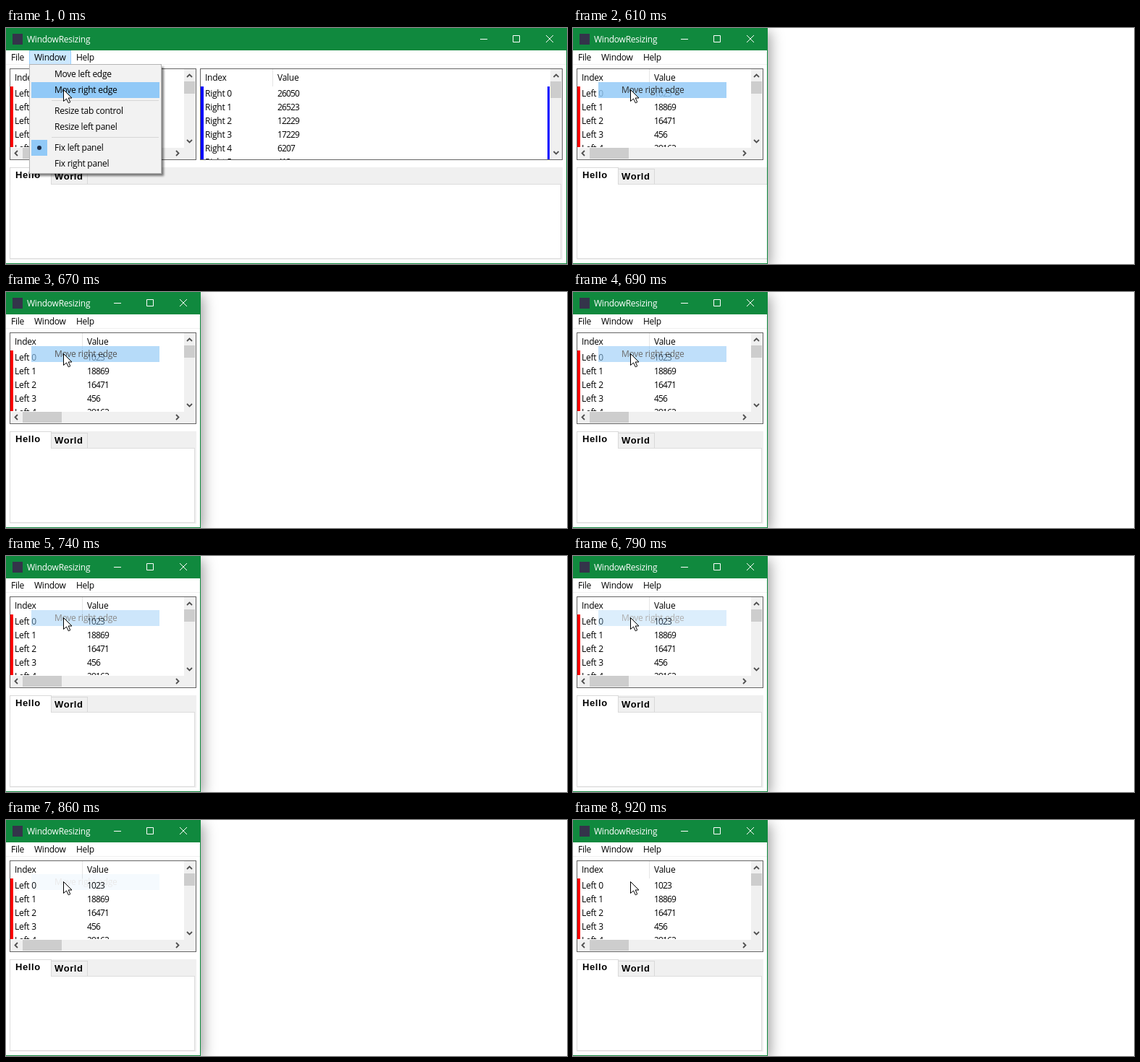
These frames come from a looping animation (775x327 px, 1.92 s). An HTML page:

```html
<!DOCTYPE html>
<html lang="en">
<head>
<meta charset="utf-8">
<title>WindowResizing</title>
<style>
  html, body { margin: 0; width: 100%; height: 100%; overflow: hidden; background: #fff; }
  body { position: relative; }
  svg, .win, .tabs, .page, .tab { position: absolute; box-sizing: border-box; }
  svg { left: 0; top: 0; width: 775px; height: 327px; }
  text { font: 12px "Open Sans", "Noto Sans", sans-serif; letter-spacing: -.25px; fill: #000; white-space: pre; }
  rect { shape-rendering: crispEdges; }
  .num { letter-spacing: -.86px; }
  .line { fill: none; stroke-width: 1; }

  .win, .tabs, .buttons, .popup, .item { animation: 1920ms step-end infinite; }
  .win {
    left: 0; top: 0; width: 775px; height: 327px; overflow: hidden; background: #fff;
    box-shadow: 3px 5px 18px rgba(0, 0, 0, .4);
    animation-name: shrink;
  }
  .win::after { content: ""; position: absolute; inset: 0; border: 1px solid #10893e; border-left: 0; }

  .tabs { left: 5px; top: 193px; width: 764px; height: 128px; background: #f0f0f0; animation-name: fit; }
  .page { left: 0; top: 23px; right: 2px; bottom: 1px; background: #fff; border: 1px solid #dcdcdc; }
  .tab {
    border: 1px solid #d9d9d9; border-bottom: 0; background: #f0f0f0;
    font: bold 13px/18px "Liberation Sans", Arial, sans-serif; letter-spacing: .6px; white-space: nowrap;
  }
  .hello { left: 0; top: 0; width: 58px; height: 24px; padding: 1px 0 0 7px; background: #fff; }
  .world { left: 57px; top: 2px; width: 51px; height: 21px; padding: 1px 0 0 4px; }

  .buttons { animation-name: slide; }
  .popup { animation-name: close; }
  .item { animation-name: fade; }

  @keyframes shrink { 0% { width: 775px; } 31.77%, 100% { width: 269px; } }
  @keyframes fit { 0% { width: 764px; } 33.333%, 100% { width: 258px; } }
  @keyframes slide { 0% { transform: none; } 31.77%, 100% { transform: translateX(-506px); } }
  @keyframes close { 0% { visibility: visible; } 31.77%, 100% { visibility: hidden; } }
  @keyframes fade {
    0% { opacity: 1; }
    31.77% { opacity: .82; }
    33.333% { opacity: .75; }
    34.895% { opacity: .66; }
    35.937% { opacity: .58; }
    38.541% { opacity: .45; }
    41.145% { opacity: .31; }
    42.708% { opacity: .2; }
    44.791% { opacity: .08; }
    47.916%, 100% { opacity: 0; }
  }
</style>
</head>
<body>
<div class="win">
  <svg viewBox="0 0 775 327">
    <defs>
      <clipPath id="leftRows"><rect x="6" y="57" width="240" height="108"/></clipPath>
      <clipPath id="rightRows"><rect x="269" y="57" width="483" height="125"/></clipPath>
      <path id="chevron" class="line" d="M-3.5 2L0 -1.5L3.5 2" stroke="#505050" style="stroke-width:1.8"/>
    </defs>

    <rect width="775" height="31" fill="#10893e"/>
    <rect x="9" y="8" width="14" height="15" fill="#34344a"/>
    <text x="29" y="20" style="fill:#fff">WindowResizing</text>
    <g class="buttons line" stroke="#fff">
      <path d="M655 15.5H665M700.5 10.5H709.5V19.5H700.5Z"/>
      <path d="M746 10L756 20M756 10L746 20"/>
    </g>

    <rect y="50" width="775" height="1" fill="#f0f0f0"/>
    <rect class="popup" x="32.5" y="31.5" width="57" height="19" fill="#cce8ff" stroke="#99d1ff"/>
    <text x="7" y="45">File</text>
    <text x="39" y="45">Window</text>
    <text x="97" y="45">Help</text>

    <g class="line">
      <rect x="5.5" y="56.5" width="257" height="126" stroke="#646464"/>
      <rect x="268.5" y="56.5" width="500" height="126" stroke="#646464"/>
      <path d="M105.5 57V81M368.5 57V81" stroke="#e5e5e5"/>
    </g>
    <g id="left" clip-path="url(#leftRows)"></g>
    <g id="right" clip-path="url(#rightRows)"></g>
    <rect x="6" y="81" width="4" height="84" fill="#f00"/>
    <path d="M269 81h4v101h-4zM748 81h3v101h-3z" fill="#00f"/>

    <path d="M246 57h16v125H6v-16H246zM752 57h16v125h-16z" fill="#f0f0f0"/>
    <path d="M246 74h15v17h-15zM23 166h54v15H23zM752 74h15v23h-15z" fill="#cdcdcd"/>
    <use href="#chevron" transform="translate(253.5 66)"/>
    <use href="#chevron" transform="translate(253.5 157) rotate(180)"/>
    <use href="#chevron" transform="translate(14 173.5) rotate(-90)"/>
    <use href="#chevron" transform="translate(237 173.5) rotate(90)"/>
    <use href="#chevron" transform="translate(760 66)"/>
    <use href="#chevron" transform="translate(760 173) rotate(180)"/>
  </svg>
  <div class="tabs">
    <div class="page"></div>
    <div class="tab hello">Hello</div>
    <div class="tab world">World</div>
  </div>
</div>

<svg viewBox="0 0 775 327">
  <defs>
    <filter id="blur" x="-10%" y="-10%" width="120%" height="120%"><feGaussianBlur stdDeviation="1.5"/></filter>
  </defs>
  <g class="popup">
    <rect x="36" y="54" width="182" height="151" opacity=".5" filter="url(#blur)"/>
    <rect x="32.5" y="50.5" width="182" height="151" fill="#f2f2f2" stroke="#b4b4b4"/>
    <path class="line" d="M63 100.5H211M63 151.5H211" stroke="#d7d7d7"/>
    <rect x="35" y="155" width="22" height="22" fill="#91c9f7"/>
    <circle cx="46" cy="166" r="3" fill="#1c2b45"/>
    <text x="67" y="68">Move left edge</text>
    <text x="67" y="119">Resize tab control</text>
    <text x="67" y="141">Resize left panel</text>
    <text x="67" y="170">Fix left panel</text>
    <text x="67" y="192">Fix right panel</text>
  </g>
  <g class="item">
    <rect x="35" y="75" width="177" height="22" fill="#91c9f7"/>
    <text x="67" y="90">Move right edge</text>
  </g>
  <path d="M79.5 85.5V101.5L83.5 98L86.3 103.8L88.8 102.7L86.2 97H91Z" fill="#fff" stroke="#000"/>
</svg>

<script>
  function fillList(id, name, x, values) {
    const cell = (dx, y, s, cls = "") => `<text class="${cls}" x="${x + dx}" y="${y}">${s}</text>`;
    const rows = values.map((v, i) => cell(0, 95 + 19 * i, `${name} ${i}`) + cell(100, 95 + 19 * i, v, "num"));
    document.getElementById(id).innerHTML = cell(0, 73, "Index") + cell(100, 73, "Value") + rows.join("");
  }
  fillList("left", "Left", 12, [1023, 18869, 16471, 456, 28163]);
  fillList("right", "Right", 275, [26050, 26523, 12229, 17229, 6207, 412]);
</script>
</body>
</html>
```
